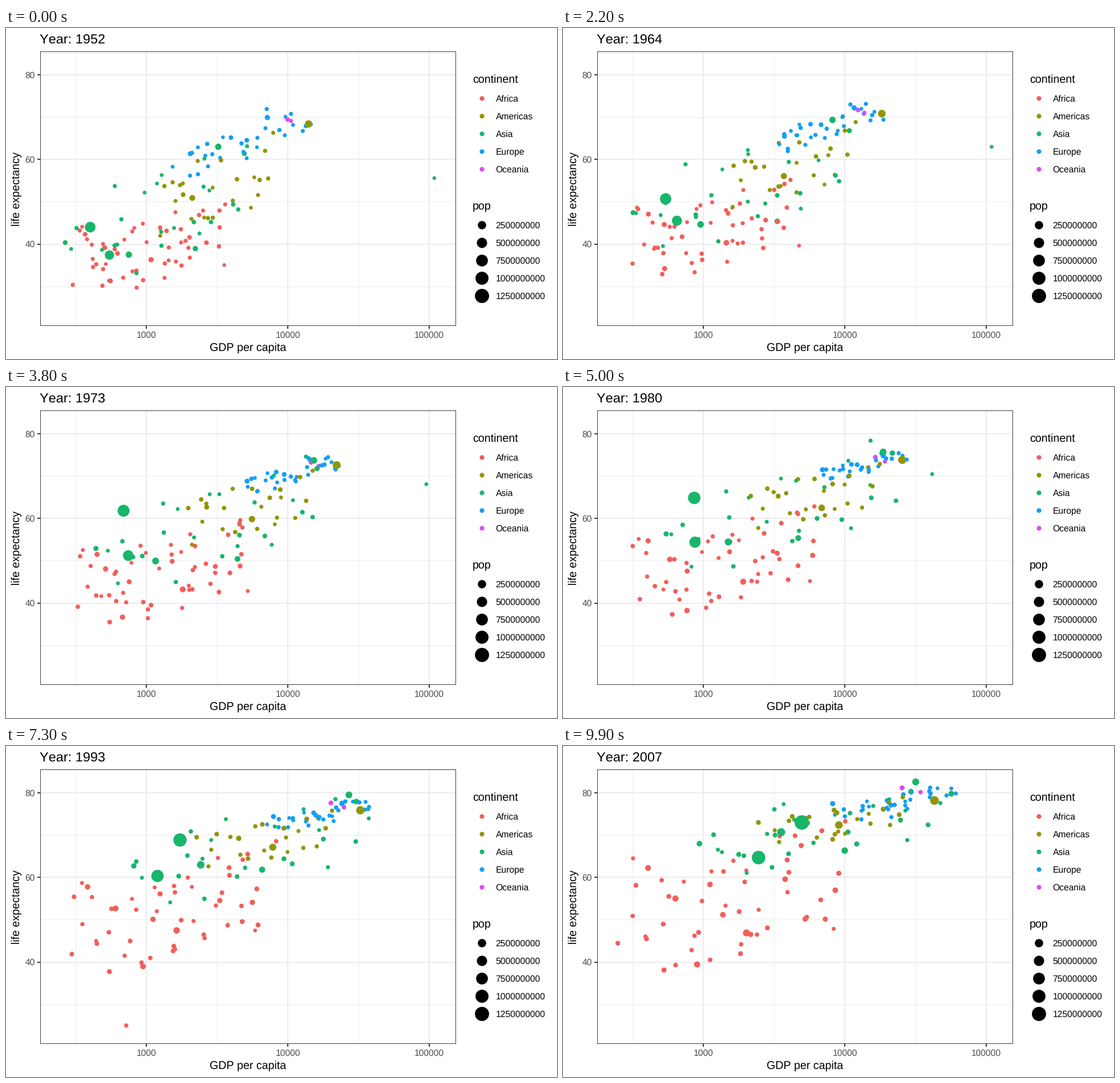
A matplotlib script for the animation above (10 s loop, 966x580 px).

```python
import numpy as np
import matplotlib.pyplot as plt
from matplotlib.animation import FuncAnimation
from matplotlib.patches import Rectangle

W, H, DPI = 966, 580, 100
FRAMES, INTERVAL = 100, 100
PX = 72 / DPI
LEFT, RIGHT, TOP, BOTTOM = 60, 789, 41, 522

SURVEYS = np.arange(1952, 2008, 5)
YEARS = np.linspace(1952, 2007, FRAMES)
ERAS = (1952, 1980, 2007)

plt.rcParams["font.family"] = ["Liberation Sans", "DejaVu Sans"]
plt.rcParams["text.hinting"] = "none"
plt.rcParams["text.kerning_factor"] = 6

AF, AM, AS, EU, OC = "Africa", "Americas", "Asia", "Europe", "Oceania"
COLOR = {AF: "#F35E5A", AM: "#929505", AS: "#18B56A", EU: "#139FF5", OC: "#DB4DF0"}

rng = np.random.default_rng(8)
paths = []  # (color, x per year, y per year, marker area per year)


def px_x(log_gdp):
    return LEFT + (log_gdp - 2.2487) * (RIGHT - LEFT) / 2.94


def px_y(life):
    return BOTTOM - (life - 20.65) * (BOTTOM - TOP) / 64.9


def area(millions):
    """Marker area in square points."""
    d = 6.32 + 18.99 * np.sqrt(np.maximum(millions - .06, 0) / 1318.6)
    return (d * PX) ** 2


def add(cont, pop, growth, log_gdp, life):
    millions = pop * growth ** ((YEARS - 1952) / 55)
    paths.append((COLOR[cont], px_x(log_gdp), px_y(life), area(millions)))


def spread(n):
    """Evenly spaced scores in random order, standard deviation about 1."""
    return rng.permutation(np.linspace(-1.7, 1.7, n))


def wobble(size):
    """Small random walk that turns at every survey."""
    walk = np.cumsum(rng.normal(0, size, len(SURVEYS)))
    return np.interp(YEARS, SURVEYS, walk - walk.mean())


def crowd(cont, n, link, growth, wealth, wealth_sd, life, life_sd):
    """Countries scattered round a drifting centre; link ties life to wealth."""
    centre_x, sd_x, centre_y, sd_y = (np.interp(YEARS, ERAS, v)
                                      for v in (wealth, wealth_sd, life, life_sd))
    for rich, luck in zip(spread(n), spread(n)):
        pop = min(rng.lognormal(1.2, 1.1), 50)
        health = link * rich + np.sqrt(1 - link ** 2) * luck
        add(cont, pop, growth, centre_x + sd_x * (rich + wobble(.11)),
            centre_y + sd_y * (health + wobble(.07)))


def giant(cont, pop, growth, *stops):
    """A prominent country, led through (year, GDP, life expectancy)."""
    year, gdp, life = np.array(stops, float).T
    add(cont, pop, growth, np.interp(YEARS, year, np.log10(gdp)), np.interp(YEARS, year, life))


crowd(AF, 50, .35, 3.8, (3.0, 3.16, 3.2), (.3, .38, .45), (39, 49.5, 54.5), (5, 6.3, 8.5))
crowd(AM, 23, .7, 2.6, (3.5, 3.78, 3.94), (.25, .27, .27), (53, 65.5, 73.3), (8, 5.5, 3.3))
crowd(AS, 27, .65, 2.8, (3.1, 3.56, 3.8), (.36, .5, .5), (46.5, 61.5, 70.8), (8, 7.5, 5.5))
crowd(EU, 30, .85, 1.4, (3.7, 4.14, 4.34), (.27, .18, .23), (64.2, 72.6, 77.6), (4.6, 2, 2.4))
crowd(OC, 2, 0, 2.3, (4.01, 4.25, 4.47), (.007, .02, .04), (69.3, 74, 80.7), (.1, .3, .3))
rng.shuffle(paths)

giant(AF, 33, 4.1, (1952, 1077, 36.3), (1977, 1982, 44.5), (1992, 1620, 47.5), (2007, 2014, 46.9))
giant(AF, 2.5, 3.5, (1952, 493, 40), (1987, 848, 44), (1992, 737, 23.6), (1997, 590, 36.1), (2007, 863, 46.2))
giant(AM, 157, 1.9, (1952, 13990, 68.4), (1977, 24073, 73.4), (2007, 42952, 78.2))
giant(AM, 57, 3.3, (1952, 2109, 50.9), (1977, 6660, 61.5), (2007, 9066, 72.4))
giant(AS, .2, 15, (1952, 108382, 55.6), (1972, 109348, 67.7), (1982, 31354, 71.3), (2007, 47307, 77.6))
giant(AS, 86, 1.5, (1952, 3217, 63), (1972, 14779, 73.4), (1992, 26825, 79.4), (2007, 31656, 82.6))
giant(AS, 82, 2.7, (1952, 750, 37.5), (1972, 1111, 49.2), (1992, 2383, 62.7), (2007, 3541, 70.7))
giant(AS, 372, 3, (1952, 547, 37.4), (1972, 724, 50.7), (1992, 1164, 60.2), (2007, 2452, 64.7))
giant(AS, 556, 2.4, (1952, 400, 44), (1962, 488, 44.5), (1967, 613, 58.4), (1977, 741, 64),
      (1992, 1656, 68.7), (2007, 4959, 73))

colors = [p[0] for p in paths]
xs, ys, sizes = (np.array([p[k] for p in paths]) for k in (1, 2, 3))

fig = plt.figure(figsize=(W / DPI, H / DPI), dpi=DPI, facecolor="white")
ax = fig.add_axes([0, 0, 1, 1])
ax.set(xlim=(0, W), ylim=(H, 0))
ax.axis("off")


def line(x, y, color, width):
    ax.plot(x, y, color=color, lw=width * PX, solid_capstyle="butt", zorder=1)


def label(x, y, s, size, color="black", **kw):
    return ax.text(x, y, s, fontsize=size * PX, color=color, va="baseline", **kw)


def legend_row(y, s, size, color):
    ax.scatter(833.5, y, s=size, c=color, lw=0)
    label(858.7, y + 5.7, s, SMALL)


GRID, DARK, GREY = "#EBEBEB", "#333333", "#4D4D4D"
SMALL, MEDIUM, LARGE = 15.65, 19.6, 23.5

# Minor grid first, then major grid, ticks and labels
for v in (2.5, 3.5, 4.5):
    line([px_x(v)] * 2, [TOP, BOTTOM], GRID, 1)
for v in (30, 50, 70):
    line([LEFT, RIGHT], [px_y(v)] * 2, GRID, 1)
for v in (3, 4, 5):
    x = px_x(v)
    line([x, x], [TOP, BOTTOM], GRID, 1.9)
    line([x, x], [BOTTOM, BOTTOM + 5], DARK, 1.9)
    label(x, 543, str(10 ** v), SMALL, GREY, ha="center")
for v in (40, 60, 80):
    y = px_y(v)
    line([LEFT, RIGHT], [y, y], GRID, 1.9)
    line([LEFT - 5, LEFT], [y, y], DARK, 1.9)
    label(51, y + 5.7, str(v), SMALL, GREY, ha="right")

# Panel border, its outer half clipped away
border = Rectangle((LEFT, TOP), RIGHT - LEFT, BOTTOM - TOP, fill=False,
                   ec=DARK, lw=1.9 * PX, zorder=5, snap=False)
ax.add_patch(border)
border.set_clip_path(border)

label(424.2, 566, "GDP per capita", MEDIUM, ha="center")
label(24, 282, "life expectancy", MEDIUM, ha="center", rotation=90, rotation_mode="anchor")
title = label(59, 26.7, "", LARGE)

label(818, 95.6, "continent", MEDIUM)
for i, (name, color) in enumerate(COLOR.items()):
    legend_row(123.2 + 30.9 * i, name, (8.2 * PX) ** 2, color)

label(818, 317.7, "pop", MEDIUM)
for i in range(5):
    millions = 250 * (i + 1)
    legend_row(345.2 + 30.9 * i, f"{millions}000000", area(millions), "black")

dots = ax.scatter(xs[:, 0], ys[:, 0], s=sizes[:, 0], c=colors, lw=0, zorder=3)


def update(i):
    dots.set_offsets(np.column_stack([xs[:, i], ys[:, i]]))
    dots.set_sizes(sizes[:, i])
    title.set_text(f"Year: {round(YEARS[i])}")
    return dots, title


anim = FuncAnimation(fig, update, frames=FRAMES, interval=INTERVAL, repeat=True, repeat_delay=0)
plt.show()
```
